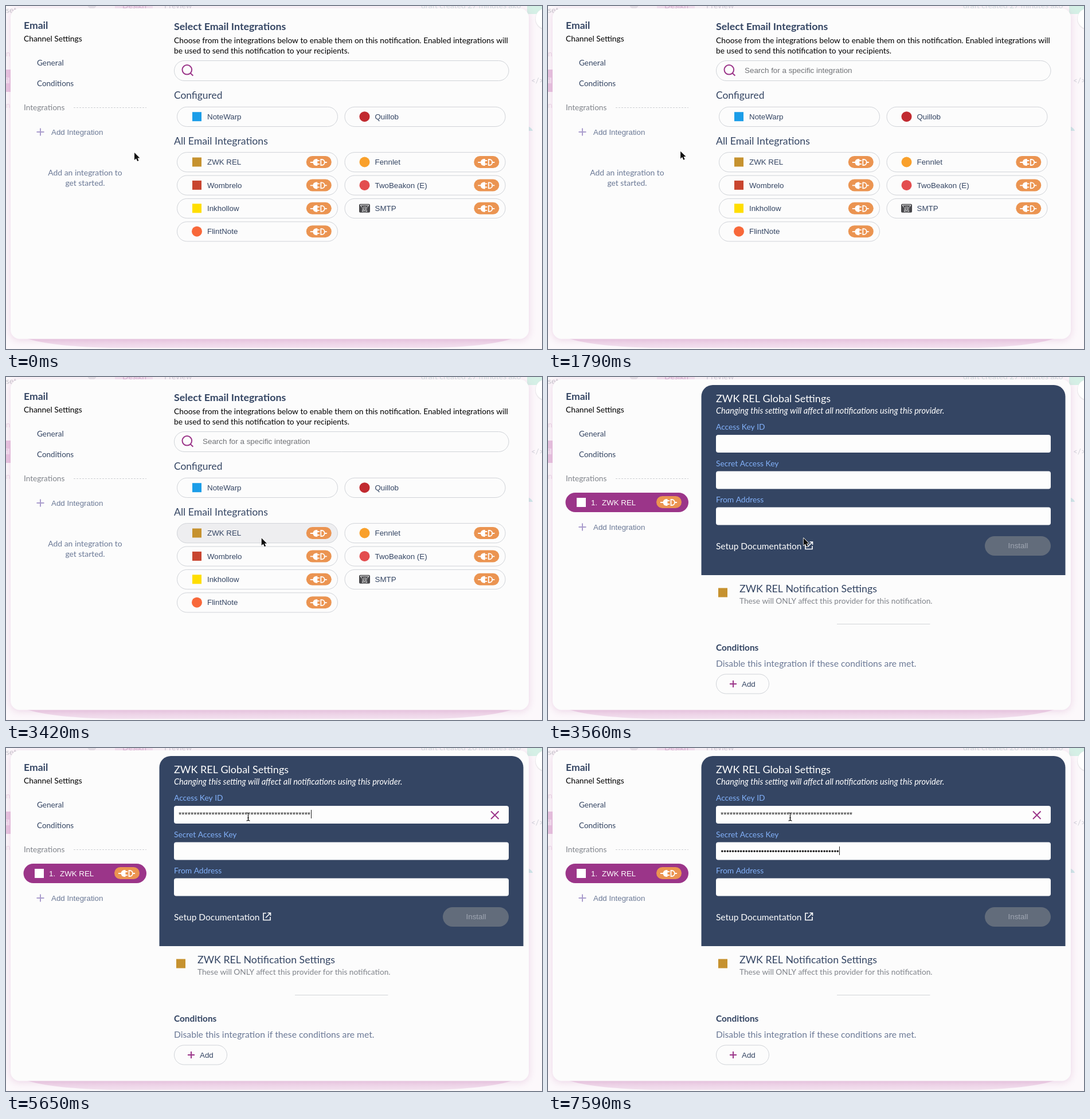
Recreate the animation shown at these times as an HTML page with a canvas. Size 935 by 599 pixels, loop 8 s.

```html
<!DOCTYPE html>
<html lang="en">
<head>
<meta charset="utf-8">
<title>Email channel settings</title>
<style>
  html, body { margin: 0; width: 100%; height: 100%; overflow: hidden; background: #fcf8fb; }
  canvas { display: block; }
</style>
</head>
<body>
<canvas id="stage" width="935" height="599"></canvas>
<script>
const ctx = document.getElementById('stage').getContext('2d');
const LOOP = 8000;
const NAVY = '#344563', PURPLE = '#9b3589', ORANGE = '#eb9451', BORDER = '#d0d3d8';
const GREY = '#80848b', SLATE = '#6b7996', GOLD = '#c6922f', LILAC = '#aa9dcd';
const PROVIDER = 'ZWK REL';
const SECRET_LENGTH = 44;
const lato = (size, style = '') => `${style} ${size}px Lato, sans-serif`;
const arial = (size = 13.33) => `${size}px "Liberation Sans", Arial, sans-serif`;

// name, icon shape, icon colour, column, top edge, can be installed
const PROVIDERS = [
  ['NoteWarp', 'square', '#1b9de8', 0, 176, false],
  ['Quillob', 'circle', '#c12a30', 1, 176, false],
  [PROVIDER, 'square', GOLD, 0, 255.3, true],
  ['Fennlet', 'circle', '#f9a02b', 1, 255.3, true],
  ['Wombrelo', 'square', '#c8452f', 0, 295.7, true],
  ['TwoBeakon (E)', 'circle', '#e34d4f', 1, 295.7, true],
  ['Inkhollow', 'square', '#ffde00', 0, 336.1, true],
  ['SMTP', 'mail', '#47474a', 1, 336.1, true],
  ['FlintNote', 'circle', '#f8683a', 0, 376.5, true]
];
const FIELDS = [['Access Key ID', 101], ['Secret Access Key', 164.5], ['From Address', 227.5]];

function text(str, x, y, font, color, align = 'left') {
  ctx.font = font;
  ctx.fillStyle = color;
  ctx.textAlign = align;
  ctx.fillText(str, x, y);
}

function box(x, y, w, h, r, fill, stroke) {
  ctx.beginPath();
  ctx.roundRect(x, y, w, h, r);
  if (fill) { ctx.fillStyle = fill; ctx.fill(); }
  if (stroke) { ctx.strokeStyle = stroke; ctx.lineWidth = 1; ctx.stroke(); }
}

function disc(x, y, r, fill) {
  ctx.beginPath();
  ctx.arc(x, y, r, 0, Math.PI * 2);
  ctx.fillStyle = fill;
  ctx.fill();
}

function stroke(path, color, width = 1) {
  ctx.strokeStyle = color;
  ctx.lineWidth = width;
  ctx.stroke(new Path2D(path));
}

function at(x, y, draw) {
  ctx.save();
  ctx.translate(x, y);
  draw();
  ctx.restore();
}

function plus(x, y, r, color) {
  stroke(`M${x - r} ${y}h${2 * r}M${x} ${y - r}v${2 * r}`, color, 2);
}

function plug(x, y) {
  box(x - 22, y - 10.5, 44, 21, 10.5, ORANGE);
  at(x, y + .5, () => {
    ctx.fillStyle = '#fff';
    ctx.fill(new Path2D('M-2.5 -6H-4.5A6 6 0 0 0 -4.5 6H-2.5Z'));
    stroke('M-15 0H-9M-3 -3H1M-3 3H1M9 0H14', '#fff', 1.8);
    stroke('M3.5 -5H5A5 5 0 0 1 5 5H3.5Z', '#fff', 1.8);
  });
}

function mailIcon(x, y, color) {
  box(x - 9.5, y - 7.5, 19, 15, 2, color);
  at(x, y, () => {
    stroke('M-7.5 -5.5L-4 -1V5.5H4V-1L7.5 -5.5Z', '#fff', 1);
    disc(0, .5, 5.2, color);
    text('@', 0, 3.5, arial(9.5), '#fff', 'center');
  });
}

function icon(kind, x, y, color) {
  if (kind === 'circle') disc(x, y, 9, color);
  else if (kind === 'square') box(x - 8, y - 8, 16, 16, 0, color);
  else mailIcon(x, y, color);
}

function backdrop(minutes) {
  ctx.fillStyle = '#fcf8fb';
  ctx.fillRect(0, 0, 935, 599);
  text('set', 0, 12, lato(14), '#c5c5cb');
  box(190, -20, 66, 24, 0, '#f5e4f1');
  disc(150, -3, 8, '#e6e4e8');
  text('Design', 203, 4, lato(13.8), '#d6b1cf');
  text('Preview', 276, 4, lato(13.8), '#cdcdd5');
  text(`draft created ${minutes} minutes ago`, 724, 4, lato(13.8), '#cfe2df');
  box(909, -10, 40, 24, 0, '#d5f0e6');
  disc(942, 23, 19, '#ece9ec');
  disc(942, 22, 18, '#fff');
  text('</>', 916, 135, lato(13.5), '#cfcfd8');
  text('n', 0, 88, lato(13), '#e8d4e3');
  text('na', 0, 178, lato(13), '#ead9e6');
  box(-5, 111, 20, 39, 0, '#e6c3df');
  text('il', 0, 135, lato(13.5), '#fff');
  ctx.fillStyle = '#cbe9e8';
  ctx.fill(new Path2D('M911 210Q917 213 919 218H911Z'));

  const glow = ctx.createLinearGradient(0, 580, 0, 599);
  glow.addColorStop(0, '#ecd0e5');
  glow.addColorStop(1, '#f3e1ef');
  ctx.fillStyle = glow;
  ctx.fill(new Path2D('M28 578Q70 594 180 597H750Q850 594 892 578Z'));
  ctx.save();
  ctx.shadowColor = 'rgba(199,125,181,.3)';
  ctx.shadowBlur = 13;
  ctx.shadowOffsetY = 2;
  box(8, 4, 904, 577.5, 16, '#fcfcfc');
  ctx.restore();
}

function addIntegration(y, hovered) {
  if (hovered) {
    ctx.setLineDash([3, 2]);
    box(30.5, y - 17.5, 214, 35, 17.5, '#ece8f3', '#b8a9d2');
    ctx.setLineDash([]);
  }
  plus(60, y, 6.5, LILAC);
  text('Add Integration', 79, y + 4.7, arial(), SLATE);
}

function sidebar(installed, hovered) {
  text('Email', 31, 40, lato(17.6, 'bold'), NAVY);
  text('Channel Settings', 31, 61.5, lato(13.8), '#000');
  text('General', 54, 103.5, lato(13.6), NAVY);
  text('Conditions', 54, 140, lato(13.5), NAVY);
  text('Integrations', 31, 182, lato(13.6), GREY);
  ctx.setLineDash([3, 2]);
  stroke('M118 177.5H245', '#cdcfd3');
  ctx.setLineDash([]);
  if (installed) {
    box(30.5, 202, 214.5, 34, 17, PURPLE);
    icon('square', 58, 219, '#fff');
    text('1.', 75, 223.5, arial(), '#fff');
    text(PROVIDER, 94, 223.5, arial(), '#fff');
    plug(211, 218.5);
    addIntegration(262, false);
  } else {
    addIntegration(220, hovered);
    text('Add an integration to', 138, 296, lato(13.9), SLATE, 'center');
    text('get started.', 138, 314, lato(13.9), SLATE, 'center');
  }
}

function integrationList(t, hovered) {
  text('Select Email Integrations', 293, 42, lato(17.8, 'bold'), NAVY);
  text('Choose from the integrations below to enable them on this notification. Enabled integrations will',
    293, 65, lato(13.77), '#000');
  text('be used to send this notification to your recipients.', 293, 83, lato(13.77), '#000');
  box(293.5, 95.5, 583.5, 35, 17.5, '#fcfcfc', BORDER);
  stroke('M307.5 111.3a8.3 8.3 0 1 0 16.6 0a8.3 8.3 0 1 0 -16.6 0M321.7 117.2L326.3 121.8', PURPLE, 2);
  if (t >= 1050) text('Search for a specific integration', 343, 117, arial(13.4), '#717377');
  else if (t >= 600) caret(343, 106);

  text('Configured', 293, 162, lato(17.4), NAVY);
  text('All Email Integrations', 293, 242, lato(17.7), NAVY);
  for (const [name, kind, color, column, top, installable] of PROVIDERS) {
    const x = 298.5 + column * 292.5, middle = top + 17.2;
    box(x, top + .3, 280, 34.2, 17.1, hovered && name === PROVIDER ? '#eeeef0' : '#fcfcfc', BORDER);
    icon(kind, x + 34.5, middle, color);
    text(name, x + 52.5, middle + 4.7, arial(), NAVY);
    if (installable) plug(x + 247.3, middle);
  }
}

function caret(x, y) {
  ctx.fillStyle = '#222';
  ctx.fillRect(x, y, 1, 15);
}

function providerSettings(t) {
  box(267.5, 14, 635, 332, [20, 20, 0, 0], NAVY);
  text(`${PROVIDER} Global Settings`, 293, 44, lato(18), '#fff');
  text('Changing this setting will affect all notifications using this provider.',
    293, 64, lato(14.5, 'italic'), '#fff');
  for (const [label, top] of FIELDS) {
    text(label, 293, top - 9, lato(13.8), '#82b1fa');
    box(293, top, 584, 31, 4, '#fdfdfd');
  }
  if (t >= 5650) {
    text('*'.repeat(SECRET_LENGTH), 301, 120.5, arial(13.45), '#222');
    stroke('M846 110.5L859.5 124M859.5 110.5L846 124', PURPLE, 2);
  }
  if (t >= 7590) text('•'.repeat(SECRET_LENGTH), 301.5, 185, arial(13.4), '#222');
  if (t >= 4610 && t < 5050) caret(301, 108);
  if (t >= 5650 && t < 6100) caret(532, 108);
  if (t >= 6390 && t < 6840 || t >= 7440 && t < 7590) caret(301, 172);
  if (t >= 7590) caret(508, 172);

  text('Setup Documentation', 293, 301, lato(15.5), '#fff');
  stroke('M454 288.5H449V300.5H461V295M456.5 288H461.5V293M461 288.5L453 296.5', '#fff', 1.6);
  box(762, 278, 115, 34, 17, '#626c7b');
  text('Install', 820, 299, arial(), '#a0a7b3', 'center');

  icon('square', 305, 376.5, GOLD);
  text(`${PROVIDER} Notification Settings`, 334, 376, lato(17.8), NAVY);
  text('These will ONLY affect this provider for this notification.', 334, 396, lato(13.67), GREY);
  stroke('M504 431.5H666.5', '#d2d4d8');
  text('Conditions', 293, 477.5, lato(15.4, 'bold'), NAVY);
  text('Disable this integration if these conditions are met.', 293, 505.5, lato(15.7), SLATE);
  box(293.5, 519, 92, 34, 17, '#fcfcfc', BORDER);
  plus(323, 536, 6, PURPLE);
  text('Add', 338, 540.7, arial(), NAVY);
}

// Pointer moves advance in discrete steps, as a low frame rate recording does.
const stepped = (t, start, end, count) => {
  const done = Math.floor((t - start) / ((end - start) / (count - 1)) + 1e-6) + 1;
  return Math.min(Math.max(done / count, 0), 1);
};
const curve = (p, a, b, c) => (1 - p) ** 2 * a + 2 * p * (1 - p) * b + p * p * c;

function pointerAt(t) {
  if (t < 1650) {
    const p = stepped(t, 300, 750, 4);
    return [224 - 13 * p, 256 - 34 * p];
  }
  if (t < 3860) {
    const p = stepped(t, 1650, 2370, 6);
    return [curve(p, 211, 260, 445.7), curve(p, 222, 330, 281.3)];
  }
  const p = stepped(t, 3860, 4760, 7);
  return [445.7 - 23.2 * p, 281.3 - 161.3 * p];
}

const ARROW = new Path2D('M0 0V13L3 10.2L5.2 15L7.5 14L5.4 9.4H9.4Z');
const HAND = new Path2D('M-1 8V2Q-1 .4 .4 .4T1.8 2V6Q3.4 5.2 4.2 6.6Q5.6 6.1 6.2 7.4Q8 7.1 8 9V12Q8 13.5 7.2 14.5V16H.5V14.5L-3.2 10.2Q-4.2 8.6 -2.8 8Q-1.8 7.8 -1 9Z');

function pointer(x, y, kind) {
  at(x, y, () => {
    ctx.lineJoin = 'round';
    if (kind === 'beam') {
      const beam = 'M-3 -7Q0 -7 0 -5Q0 -7 3 -7M0 -5V5M-3 7Q0 7 0 5Q0 7 3 7M-1.5 2H1.5';
      stroke(beam, '#fff', 2.5);
      stroke(beam, '#111', 1.2);
      return;
    }
    const shape = kind === 'hand' ? HAND : ARROW;
    ctx.fillStyle = kind === 'hand' ? '#fff' : '#111';
    ctx.strokeStyle = kind === 'hand' ? '#111' : '#fff';
    ctx.lineWidth = kind === 'hand' ? 1.2 : 1.6;
    ctx.stroke(shape);
    ctx.fill(shape);
    if (kind === 'hand') stroke('M2 10V13.5M4 10V13.5M6 10V13.5', '#111', .8);
  });
}

function render(t) {
  const [x, y] = pointerAt(t);
  const installed = t >= 3560;
  const overAdd = !installed && x < 245 && y > 202 && y < 238;
  const overCard = !installed && x > 298 && y > 255 && y < 292;
  const overField = installed && FIELDS.some(([, top]) => y > top && y < top + 31);

  backdrop(t < 4760 ? 27 : 28);
  sidebar(installed, overAdd);
  if (installed) providerSettings(t);
  else integrationList(t, overCard);
  const kind = overField ? 'beam' : (overAdd || overCard) && t < 3420 ? 'hand' : 'arrow';
  pointer(x, y, kind);
}

const begin = performance.now();
function tick() {
  render((performance.now() - begin) % LOOP);
  requestAnimationFrame(tick);
}
tick();
</script>
</body>
</html>
```
